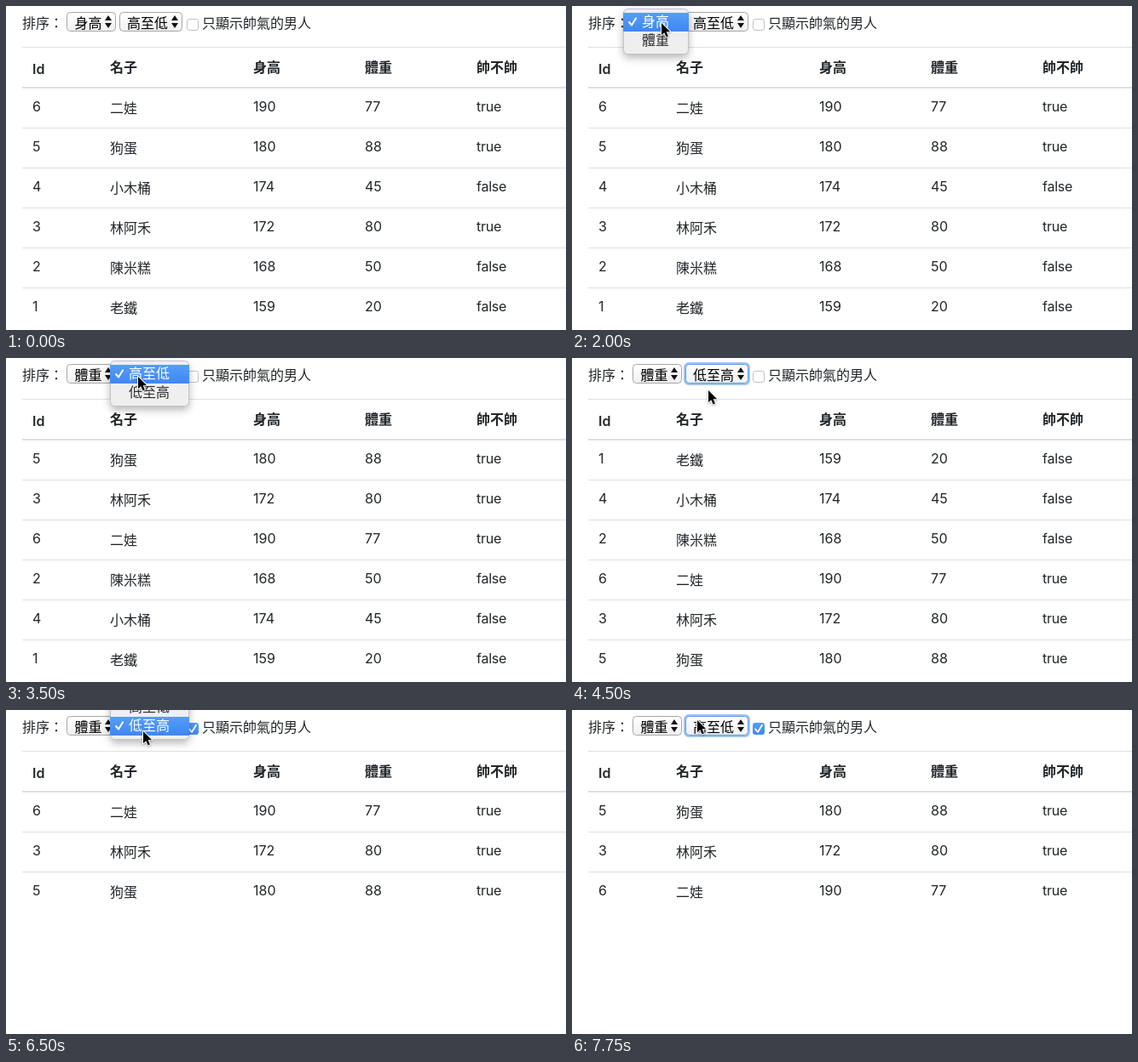
Write an HTML page that moves like this. It is 657 by 381 pixels and loops after 8 s.

```html
<!DOCTYPE html>
<html lang="zh-Hant">
<head>
<meta charset="utf-8">
<title>排序</title>
<style>
  html, body { margin: 0; width: 100%; height: 100%; overflow: hidden; background: #fff; }
  svg { display: block; width: 657px; height: 381px; }
  text { font: 16px Inter, "Noto Sans CJK TC", "Noto Sans CJK JP", "Noto Sans CJK", sans-serif; fill: #212529; white-space: pre; }
  .cjk { font-family: "Noto Sans CJK TC", "Noto Sans CJK JP", "Noto Sans CJK", sans-serif; }
  .word { letter-spacing: -.25px; }
  .head { font-weight: 600; }
  .control { fill: #000; }
  .item { fill: #2c2c2c; }
  .active { fill: #fff; }
  .menu { filter: drop-shadow(0 4px 5px rgba(0, 0, 0, .28)); }
</style>
</head>
<body>
<svg id="stage" viewBox="0 0 657 381">
  <defs>
    <linearGradient id="face" x2="0" y2="1">
      <stop stop-color="#fff"/><stop offset="1" stop-color="#f0f0f0"/>
    </linearGradient>
    <linearGradient id="blue" x2="0" y2="1">
      <stop stop-color="#569df8"/><stop offset="1" stop-color="#3f87f2"/>
    </linearGradient>
  </defs>
  <g id="page"></g>
  <g id="popup"></g>
  <path id="cursor" d="M0 0V14.3L3.3 11.3L5.6 16.4L7.9 15.4L5.7 10.3H10.2Z"
    fill="#000" stroke="#fff" stroke-width="2" stroke-linejoin="round" paint-order="stroke"
    style="filter:drop-shadow(0 1px 1px rgba(0,0,0,.3))"/>
</svg>
<script>
const LOOP = 8000;
const COLUMNS = [31, 122, 290, 421, 552];
const HEADINGS = ['Id', '名子', '身高', '體重', '帥不帥'];
const KEYS = ['身高', '體重'];
const ORDERS = ['高至低', '低至高'];
const PEOPLE = [
  [1, '老鐵', 159, 20, false],
  [2, '陳米糕', 168, 50, false],
  [3, '林阿禾', 172, 80, true],
  [4, '小木桶', 174, 45, false],
  [5, '狗蛋', 180, 88, true],
  [6, '二娃', 190, 77, true]
];
const SELECTS = [
  { x: 71, width: 58, textX: 80.5, menuX: 60, menuWidth: 77, options: KEYS, field: 'key' },
  { x: 133, width: 74, textX: 142, menuX: 122, menuWidth: 93, options: ORDERS, field: 'order' }
];

// Each step lists only what changes; menu and focus are select indexes.
const START = { key: 0, order: 0, only: false, menu: -1, hover: 0, focus: -1, cursor: null };
const STEPS = [
  [0, {}],
  [500, { cursor: [245, 43] }],
  [750, { cursor: [176, 34] }],
  [1000, { cursor: [118, 25] }],
  [1250, { cursor: [104, 22] }],
  [1750, { menu: 0, hover: 0, cursor: [104, 21] }],
  [2000, { cursor: [105, 20] }],
  [2500, { hover: 1, cursor: [104, 36] }],
  [2750, { menu: -1, key: 1, focus: 0 }],
  [3000, { cursor: [140, 26] }],
  [3250, { menu: 1, hover: 0, focus: 1, cursor: [155, 22] }],
  [3500, { cursor: [155, 22] }],
  [3750, { hover: 1, cursor: [159, 37] }],
  [4000, { menu: -1, order: 1 }],
  [4250, { cursor: [160, 38] }],
  [4500, { cursor: [160, 38] }],
  [4750, { cursor: [194, 33] }],
  [5000, { cursor: [214, 25] }],
  [5250, { only: true, focus: -1 }],
  [5500, { cursor: [214, 25] }],
  [6000, { cursor: [184, 24] }],
  [6250, { menu: 1, hover: 1, focus: 1, cursor: [163, 25] }],
  [6500, { cursor: [161, 25] }],
  [6750, { hover: 0, cursor: [152, 5] }],
  [7000, { cursor: [148, 3] }],
  [7500, { menu: -1, order: 0, cursor: [147, 8] }],
  [7750, { cursor: [147, 12] }]
];
let last = START;
const states = STEPS.map(([time, change]) => ({ time, ...(last = { ...last, ...change }) }));

const $ = id => document.getElementById(id);
const text = (x, y, value, cls = '') => `<text x="${x}" y="${y}" class="${cls}">${value}</text>`;
const box = (x, y, w, h, attrs) => `<rect x="${x}" y="${y}" width="${w}" height="${h}" ${attrs}/>`;
const rule = (y, h = 1) => box(19, y, 638, h, 'fill="#dee0e2"');
const tick = (x, y, width) =>
  `<path d="M${x} ${y}l3 3.6l5 -8.2" fill="none" stroke="#fff" stroke-width="${width}" stroke-linecap="round" stroke-linejoin="round"/>`;

function cell(value, column, y, head = '') {
  const cjk = /[\u4e00-\u9fff]/.test(value);
  const cls = cjk ? 'cjk' : typeof value === 'boolean' ? 'word' : '';
  return text(COLUMNS[column], y + (cjk ? (head ? -2 : 2) : 0), value, `${cls} ${head}`);
}

function table(state) {
  const column = state.key + 2;
  const sign = state.order ? 1 : -1;
  const rows = PEOPLE.filter(p => !state.only || p[4])
    .sort((a, b) => sign * (a[column] - b[column]));
  return rule(48) + rule(95, 2) +
    HEADINGS.map((h, i) => cell(h, i, 80, 'head')).join('') +
    rows.map((row, r) => (r ? rule(96 + 47 * r) : '') +
      row.map((value, i) => cell(value, i, 124 + 47 * r)).join('')).join('');
}

function select(s, index, state) {
  const ax = s.x + s.width - 9;
  const focused = state.focus === index;
  const ring = focused
    ? box(s.x - .5, 6.5, s.width + 1, 24, 'rx="4.5" fill="none" stroke="#9cc4f6" stroke-width="3"') : '';
  return ring +
    box(s.x + .5, 7.5, s.width - 1, 22, `rx="4" fill="url(#face)" stroke="${focused ? '#5c9cec' : '#a6a6a6'}"`) +
    text(s.textX, 26, s.options[state[s.field]], 'cjk control') +
    `<path d="M${ax - 4} 17l4 -6l4 6zM${ax - 4} 20l4 6l4 -6z" fill="#111"/>`;
}

function checkbox(checked) {
  return checked
    ? box(212, 15, 14, 14, 'rx="3" fill="url(#blue)"') + tick(215, 22.4, 1.8)
    : box(212.5, 15.5, 13, 13, 'rx="2.5" fill="#fff" stroke="#c3c3c3"');
}

function menu(state) {
  const s = SELECTS[state.menu];
  if (!s) return '';
  const chosen = state[s.field];
  const top = 3.5 - 22 * chosen;
  return box(s.menuX + .5, top, s.menuWidth - 1, 53, 'rx="5" fill="#efefef" stroke="#c4c4c4" class="menu"') +
    s.options.map((label, i) => {
      const y = 8 + 22 * (i - chosen);
      const active = i === state.hover;
      const mark = i === chosen
        ? `<g ${active ? '' : 'style="filter:invert(.83)"'}>${tick(s.menuX + 7, y + 11, 2)}</g>` : '';
      return (active ? box(s.menuX, y, s.menuWidth, 22, 'fill="url(#blue)"') : '') + mark +
        text(s.menuX + 22, y + 15.5, label, `cjk ${active ? 'active' : 'item'}`);
    }).join('');
}

function render(state) {
  $('page').innerHTML = text(19, 26, '排序：', 'cjk') +
    SELECTS.map((s, i) => select(s, i, state)).join('') +
    checkbox(state.only) + text(230, 26, '只顯示帥氣的男人', 'cjk') + table(state);
  $('popup').innerHTML = menu(state);
  $('cursor').style.display = state.cursor ? '' : 'none';
  if (state.cursor) $('cursor').setAttribute('transform', `translate(${state.cursor})`);
}

let shown;
const begin = performance.now();
function frame() {
  const time = (performance.now() - begin) % LOOP;
  const state = states.filter(s => s.time <= time).pop();
  if (state !== shown) render(shown = state);
  requestAnimationFrame(frame);
}
frame();
</script>
</body>
</html>
```
